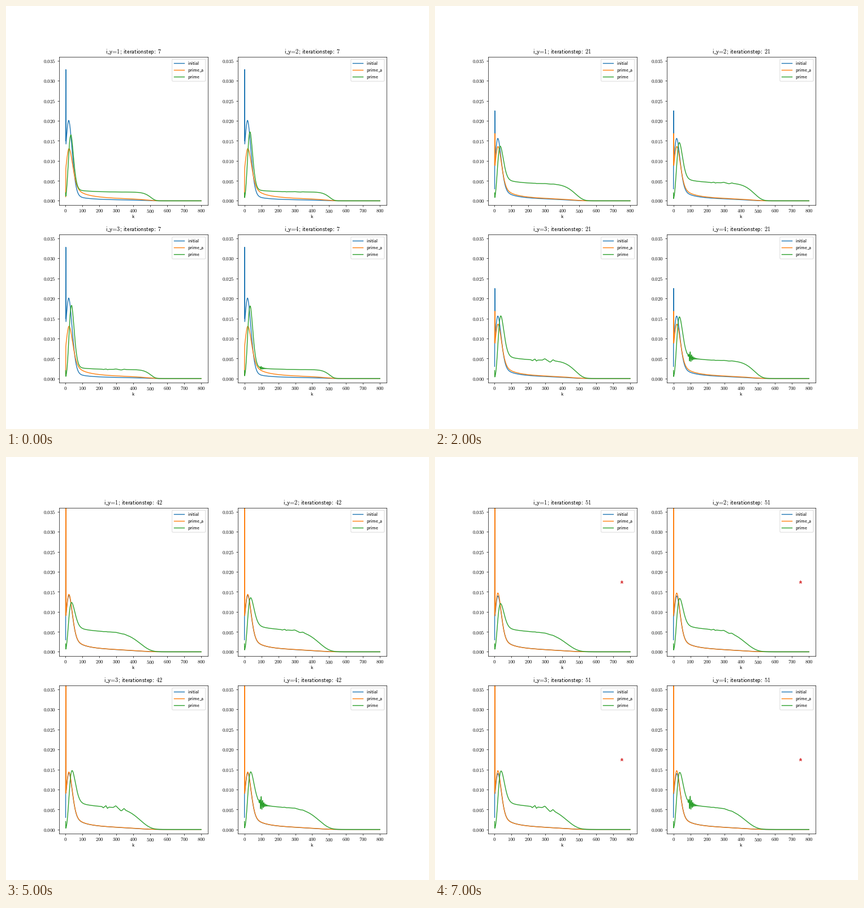
These frames come from a looping animation (748 px wide and 748 px high, 8 s). A matplotlib script:

```python
import numpy as np
import matplotlib.pyplot as plt
from matplotlib.animation import FuncAnimation
from matplotlib.patches import FancyBboxPatch

plt.rcParams["mathtext.fontset"] = "cm"

FRAME_STEPS = [7, 14, 21, 28, 35, 42, 49, 51]
UNIT = 1e-4  # spectra are computed in this unit
K = np.arange(801.0)

# amplitude and width of the peak, height, cutoff and steepness of the tail
INITIAL = np.array([[193, 29.5, 800, 485, 14], [120, 29.0, 1800, 450, 6]])
PRIME_A = np.array([[110, 31.0, 1950, 490, 12], [129, 28.5, 1750, 450, 6]])

# how "prime" differs from panel to panel
PEAK_SHIFT = [0, 2, 4, 3]
PEAK_GAIN = [0, 0.035, 0.09, 0.085]
TAIL_GAIN = [0, 0.10, 0.13, 0.10]
RIPPLE_GAIN = [0.12, 0.4, 1, 0.15]
RIPPLES = [(222, -0.05, 5), (238, 0.05, 5), (247, -0.06, 5),
           (296, 0.09, 10), (327, -0.09, 10), (345, 0.06, 7)]


def peak(distance, width, power):
    return np.exp(-(np.abs(distance) / width) ** power)


def rise(width):
    return 1 - peak(K, width, 2)


def spectrum(params):
    amp, width, tail, cut, steep = params
    return (amp * peak(K - 17.5, width, 1.8)
            + tail / np.maximum(K, 1) * rise(40) * peak(K, cut, steep))


def initial(step):
    decay = 0.53 ** ((step - 7) / 7)
    y = spectrum(INITIAL[1] + (INITIAL[0] - INITIAL[1]) * decay)
    y[0] = np.interp(step, [7, 14, 21], [150, 110, 30])
    y[1] = np.interp(step, [7, 14, 21, 28], [328, 260, 225, 420])
    return y * UNIT


def prime_a(step):
    y = spectrum(PRIME_A[0] + (PRIME_A[1] - PRIME_A[0]) * (step - 7) / 44)
    y[0] = np.interp(step, [7, 14], [10, 90])
    y[1] = np.interp(step, [7, 14, 21, 28, 42], [80, 143, 168, 237, 600])
    return y * UNIT


def ripples(panel):
    y = RIPPLE_GAIN[panel] * sum(h * peak(K - c, w, 2) for c, h, w in RIPPLES)
    if panel == 3:
        # damped ringing
        fade = np.exp(-np.abs(K - 97) / np.where(K < 97, 5, 14))
        y = y + 0.32 * fade * np.cos(2 * np.pi * (K - 99) / 8)
    return y


def prime(step, panel):
    decay = 0.6 ** ((step - 7) / 7)
    d = K - 30.5 - PEAK_SHIFT[panel]
    bump = np.where(d < 0, peak(d, 20, 2.4), peak(d, 30 - 7.2 * decay, 1.7))
    bump *= (80 + 69 * decay) * (1 + PEAK_GAIN[panel] * (1 + step / 51))

    level = 55 * (1 - np.exp(-step / 14)) * (1 - (step / 160) ** 2)
    level *= 1 + TAIL_GAIN[panel] * step / 45
    cutoff = peak(K, 505 - 1.6 * (step - 7), 20 * np.sqrt(7 / step))
    plateau = level * (1 + 0.5 * np.exp(-K / 95)) * rise(35) * cutoff

    y = (bump + plateau) * (1 + ripples(panel) * (1 - np.exp(-step / 9)))
    y[0] = 20
    return y * UNIT


def sans(text):
    return rf"$\mathsf{{{text}}}$"


def title(panel, step):
    return sans(rf"i\_\!y\!=\!{panel + 1};\,iterationstep\!:\:{step}")


def draw_key(ax, entries):
    """Legend box; its inner coordinates are pixels from the top left."""
    key = ax.inset_axes([0.7598, 0.8345, 0.2243, 0.149])
    key.set(xlim=(0, 59.1), ylim=(39, 0))
    key.axis("off")
    key.add_patch(FancyBboxPatch(
        (1.7, 1.7), 55.7, 35.6, boxstyle="round,pad=1.7", fc="white",
        ec="0.8", lw=1, alpha=0.8, clip_on=False))
    for row, (color, label) in enumerate(entries):
        y = 6.9 + 12 * row
        key.plot([3.5, 20.8], [y, y], color=color, lw=1.6)
        key.text(27, y + 3, sans(label), fontsize=10, va="baseline")


ENTRIES = [("C0", "initial"), ("C1", r"prime\_\!a"), ("C2", "prime")]

fig, grid = plt.subplots(2, 2, figsize=(12, 12), dpi=748 / 12)
fig.subplots_adjust(left=0.125, right=0.9, bottom=0.11, top=0.88,
                    wspace=0.2, hspace=0.2)
panels = []
for n, ax in enumerate(grid.flat):
    lines = [ax.plot(K, 0 * K, color=color, lw=1.6)[0] for color, _ in ENTRIES]
    star, = ax.plot([750], [0.0175], "*", color="C3", ms=6, alpha=0.8)
    ax.set_xlim(-40, 840)
    ax.set_ylim(-0.001, 0.036)
    xt, yt = np.arange(0, 801, 100), np.arange(8) * 0.005
    ax.set_xticks(xt, [f"${v}$" for v in xt])
    ax.set_yticks(yt, [f"${v:.3f}$" for v in yt])
    ax.tick_params(axis="x", pad=2.7)
    ax.set_xlabel(sans("k"), labelpad=-1.5)
    ax.set_title(title(n, 7), fontsize=12, pad=6.8)
    draw_key(ax, ENTRIES)
    panels.append((ax, lines, star))


def update(frame):
    step = FRAME_STEPS[frame]
    first, second = initial(step), prime_a(step)
    for n, (ax, lines, star) in enumerate(panels):
        for line, y in zip(lines, (first, second, prime(step, n))):
            line.set_ydata(y)
        star.set_visible(step == FRAME_STEPS[-1])
        ax.title.set_text(title(n, step))
    return []


anim = FuncAnimation(fig, update, frames=len(FRAME_STEPS), interval=1000,
                     init_func=lambda: update(0), repeat=True, blit=False)
plt.show()
```
